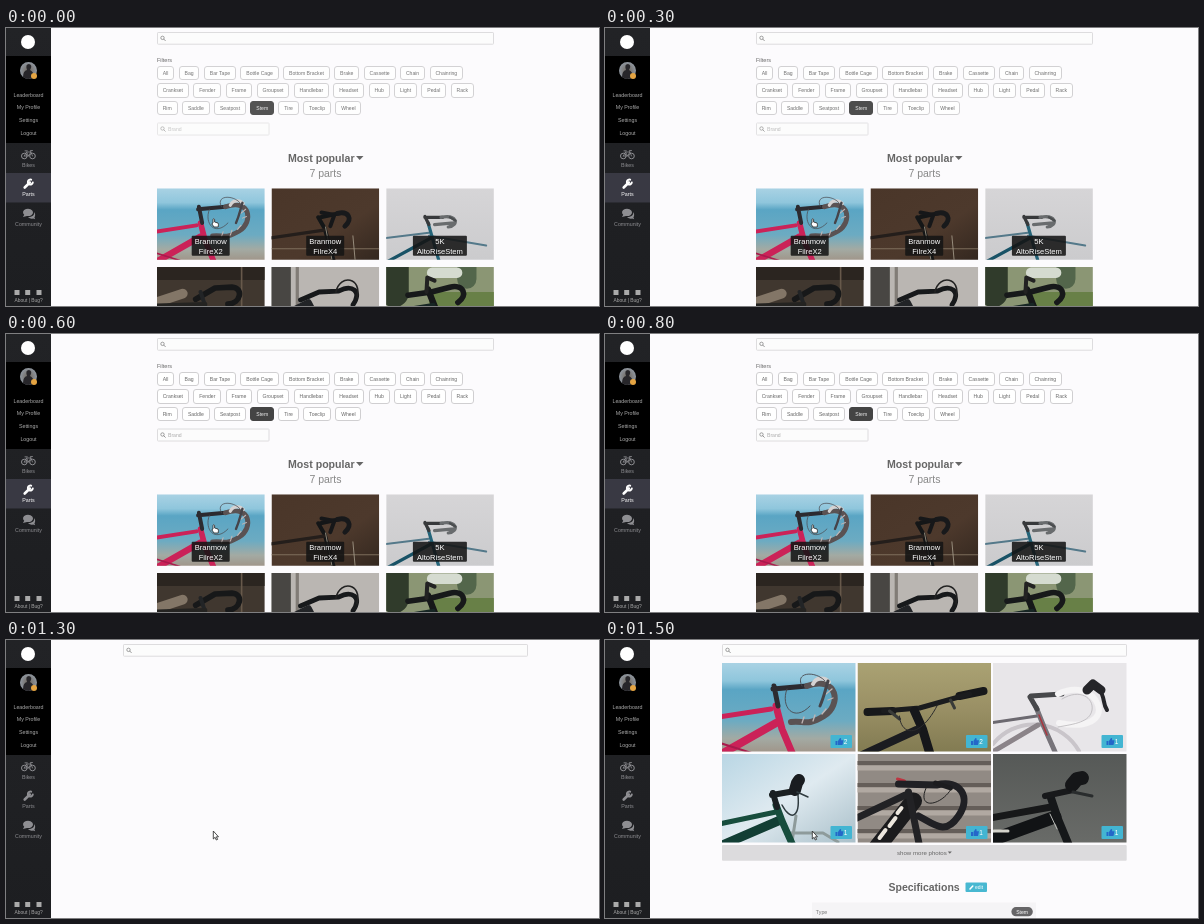
Animation, 593 px wide and 278 px high, one loop 1900 ms. Source, as an HTML page:

```html
<!DOCTYPE html>
<html lang="en">
<head>
<meta charset="utf-8">
<title>Bike parts</title>
<style>
  html, body { margin: 0; width: 100%; height: 100%; overflow: hidden; background: #fcfbfd; }
  body { position: relative; font-family: "Liberation Sans", Arial, sans-serif; }
  svg { position: absolute; left: 0; top: 0; display: block; font-family: inherit; }
  #chips { position: absolute; left: 150.8px; top: 37.7px; }
  .row { display: flex; gap: 4.5px; height: 17.5px; }
  .chip { box-sizing: border-box; height: 14.6px; padding: 0 4.85px; border: 1px solid #d0cfd1;
    border-radius: 3px; font-size: 5.1px; line-height: 12.6px; color: #666; background: #fff; white-space: nowrap; }
  .chip.on { color: #eee; background: #444; border-color: #444; }
</style>
</head>
<body>
<svg id="stage" width="593" height="278" viewBox="0 0 593 278">
  <defs>
    <linearGradient id="sea" x2="0" y2="1">
      <stop stop-color="#a9d2e4"/><stop offset=".2" stop-color="#8fc6dc"/>
      <stop offset=".3" stop-color="#5aa5c4"/><stop offset=".65" stop-color="#6cabc2"/>
      <stop offset=".85" stop-color="#a3aaa3"/><stop offset="1" stop-color="#a0968a"/>
    </linearGradient>
    <linearGradient id="grass" x2="0" y2="1">
      <stop stop-color="#aaa273"/><stop offset=".5" stop-color="#9a9065"/><stop offset="1" stop-color="#827b52"/>
    </linearGradient>
    <linearGradient id="mist" x2="1" y2="1">
      <stop stop-color="#b9d6e4"/><stop offset=".5" stop-color="#dfeaf0"/><stop offset="1" stop-color="#a9bfc9"/>
    </linearGradient>
    <linearGradient id="slate" x2="0" y2="1">
      <stop stop-color="#565957"/><stop offset="1" stop-color="#696b68"/>
    </linearGradient>
    <linearGradient id="room" x2="1" y2="1">
      <stop stop-color="#4a3629"/><stop offset=".6" stop-color="#4d392c"/><stop offset="1" stop-color="#33271f"/>
    </linearGradient>
    <linearGradient id="wall" x2="0" y2="1">
      <stop stop-color="#d6d5d7"/><stop offset="1" stop-color="#cbcbcd"/>
    </linearGradient>
    <linearGradient id="dusk" x2="0" y2="1">
      <stop stop-color="#222326"/><stop offset="1" stop-color="#1d1e21"/>
    </linearGradient>
    <radialGradient id="portrait">
      <stop stop-color="#6d655b"/><stop offset="1" stop-color="#8f969f"/>
    </radialGradient>
  </defs>
</svg>
<div id="chips"></div>

<script>
const LOOP = 1900;
const stage = document.getElementById('stage');
const chips = document.getElementById('chips');

function add(parent, tag, attrs, content) {
  const el = document.createElementNS('http://www.w3.org/2000/svg', tag);
  for (const key in attrs) el.setAttribute(key, attrs[key]);
  if (content !== undefined) el.textContent = content;
  parent.append(el);
  return el;
}
const group = (parent, transform = '') => add(parent, 'g', { transform });
const rect = (p, x, y, width, height, fill, more) => add(p, 'rect', { x, y, width, height, fill, ...more });
const dot = (p, cx, cy, r, fill, more) => add(p, 'circle', { cx, cy, r, fill, ...more });
const fillPath = (p, d, fill, more) => add(p, 'path', { d, fill, ...more });
const line = (p, d, stroke, width) => add(p, 'path', {
  d, stroke, fill: 'none', 'stroke-width': width, 'stroke-linecap': 'round', 'stroke-linejoin': 'round' });
const text = (p, x, y, size, fill, content, more) =>
  add(p, 'text', { x, y, 'font-size': size, fill, ...more }, content);
const middle = { 'text-anchor': 'middle' };
const bold = { 'font-weight': 'bold' };

// Stepped opacity: a list of [time in ms, value].
function steps(el, table) {
  const frames = table.map(([t, opacity]) => ({ offset: t / LOOP, opacity, easing: 'steps(1, end)' }));
  frames.push({ offset: 1, opacity: table[table.length - 1][1] });
  el.animate(frames, { duration: LOOP, iterations: Infinity });
}

// Each scene: background, then [colour, width, path] strokes in a 133.5 x 88.5 box.
const scenes = {
  coast: ['sea', [
    ['#cb2258', 5, 'M-3 54L49 46'], ['#cb2258', 8, 'M-4 93L54 60'],
    ['#cb2258', 7, 'M54 43L60 66L71 92'], ['#a91a4c', 2, 'M-2 80L36 92'],
    ['#2c2b30', 5, 'M52 23L56 43M51 26L85 23'],
    ['#5a5253', 6, 'M85 23C116 12 120 42 102 53S82 57 69 59'],
    ['#c1b5b4', 1.3, 'M110 26L104 31M111 35L106 37M104 46L100 51M93 52L91 58M82 54L80 60'],
    ['#d5d2d2', 4, 'M91 21C94 14 103 14 107 19'], ['#45444a', 3, 'M106 18C103 28 102 34 98 43'],
    ['#4a4a50', .9, 'M80 23C72 8 95 8 103 18M65 26C58 44 72 60 88 43']]],
  meadow: ['grass', [
    ['#17181a', 8, 'M10 49L35 48M102 33L126 28'], ['#1b1c1e', 5, 'M26 48L62 45L112 31'],
    ['#16171a', 9, 'M57 48L65 66L74 96'], ['#1b1c20', 8, 'M-4 96L59 67'],
    ['#393b39', 3, 'M32 48L42 56M93 37L97 45'], ['#2b2b2c', 1, 'M42 53C43 72 62 77 80 42']]],
  snow: ['#e8e6e9', [
    ['#c9c5ca', 4, 'M0 81A52 52 0 0 1 86 88'], ['#6c6970', 3, 'M-3 60L44 53'],
    ['#8b8489', 5, 'M-4 91L45 62'], ['#77747a', 5, 'M43 44L51 64L63 91'],
    ['#a9353e', 1.5, 'M46 52L54 72'], ['#47484b', 5, 'M37 34L44 46M38 33L69 31'],
    ['#f5f4f5', 6, 'M65 31C83 22 100 28 105 42S94 66 66 60'],
    ['#b9b6ba', .8, 'M69 36C87 25 101 35 99 47S82 61 65 64'],
    ['#252529', 9, 'M94 27L100 21L108 27'], ['#252529', 4, 'M105 25C113 34 109 40 114 47']]],
  harbor: ['mist', [
    ['#8e9b9b', 3, 'M67 79L101 79L116 88M74 62L70 88'], ['#174d3d', 5, 'M-3 70L54 58'],
    ['#123e34', 9, 'M-4 93L56 67'], ['#174d3d', 7, 'M54 51L60 67L72 94'],
    ['#1a2022', 6, 'M51 39L55 53M50 41L73 37'], ['#191c20', 12, 'M73 36L75 29L77 26'],
    ['#303c40', 1.5, 'M75 38L86 43M60 51C69 68 78 63 76 41']]],
  stairs: ['#918a84', [
    ['#655e59', 4, 'M0 9H134M0 31H134M0 54H134M0 77H134'],
    ['#b1a9a2', 5, 'M0 14H134M0 36H134M0 59H134M0 82H134'],
    ['#1b1b1d', 17, 'M19 94L56 47'], ['#222225', 7, 'M-3 65L48 41M51 38L62 92'],
    ['#ece7de', 4, 'M22 84L28 76M32 72L38 64M40 59L44 54'], ['#bd3541', 3, 'M40 25L47 27'],
    ['#202024', 7, 'M41 30L79 31C103 25 114 43 101 62S79 72 61 62'],
    ['#1c1c1f', 5, 'M78 29L93 34'], ['#222', 1, 'M70 31C57 56 82 53 93 36']]],
  tarmac: ['slate', [
    ['#171819', 7, 'M-3 64L58 53'], ['#111315', 13, 'M-4 87L62 63'],
    ['#151719', 8, 'M58 44L65 65L77 94'], ['#18191b', 6, 'M52 42L80 36'],
    ['#151618', 14, 'M79 31L84 25L89 24'], ['#292c2d', 3, 'M80 38L99 42'],
    ['#d3d2ca', 3, 'M1 77H15'], ['#bbbcb9', 1, 'M57 60L64 75']]],
  cellar: ['room', [
    ['#8b7c68', 1, 'M0 75H134'],
    ['#141617', 5, 'M58 36L66 50L78 93M61 36L84 31'], ['#18191b', 6, 'M82 31C96 28 101 38 91 47'],
    ['#161719', 5, 'M62 30L78 33L73 47'], ['#241e1b', 4, 'M-4 62L65 52'],
    ['#aaa190', 1, 'M67 48L76 94M104 92L101 59']]],
  plaster: ['wall', [
    ['#54798a', 2.5, 'M-3 62L53 55M53 59L124 71'], ['#246479', 4, 'M52 43L66 92'],
    ['#185266', 4, 'M-4 94L55 62'], ['#37393b', 4, 'M48 35L53 45M48 36L70 36'],
    ['#696c6e', 4, 'M68 36C88 32 91 46 77 48M60 45L84 43'], ['#4b4e50', 3, 'M79 36L86 40']]],
  hallway: ['#40372f', [
    ['#2b2520', 20, 'M-4 6H136'], ['#837667', 12, 'M-4 45L32 33'], ['#67594b', 2, 'M105 0V90'],
    ['#171819', 7, 'M48 40L72 26L93 25C108 26 104 45 88 46'], ['#222426', 5, 'M54 31L61 52L79 88'],
    ['#242321', 5, 'M-3 48L60 46']]],
  concrete: ['#bab6b2', [
    ['#484643', 32, 'M8-5V90'], ['#817c76', 4, 'M32 0V90'],
    ['#17191b', 6, 'M36 41L59 31L83 30C100 21 113 30 101 47'],
    ['#222427', 8, 'M28 53L46 44L69 88'], ['#222', 2, 'M80 31C85 8 113 13 106 38']]],
  garden: ['#8b9674', [
    ['#303b2b', 36, 'M10-4V32'], ['#53664b', 24, 'M100-4V15'],
    ['#d5dbd0', 13, 'M57 7H88'], ['#688047', 24, 'M65 43H136'],
    ['#17191a', 7, 'M27 35L56 31L79 25C96 21 102 35 89 44'], ['#161819', 8, 'M52 28L61 51L82 88'],
    ['#172624', 7, 'M-3 58L58 48'], ['#222', 5, 'M50 31L51 13L60 17']]]
};

function photo(parent, name, x, y, scale = 1) {
  const [back, strokes] = scenes[name];
  const frame = add(parent, 'svg', { x, y, width: 133.5 * scale, height: 88.5 * scale,
    viewBox: '0 0 133.5 88.5', preserveAspectRatio: 'xMidYMid slice' });
  rect(frame, 0, 0, 134, 89, back[0] === '#' ? back : `url(#${back})`);
  strokes.forEach(([color, width, d]) => line(frame, d, color, width));
}

function magnifier(parent, x, y) {
  dot(parent, x - .5, y - .5, 1.7, 'none', { stroke: '#888', 'stroke-width': .8 });
  line(parent, `M${x + .8} ${y + .8}l1.5 1.5`, '#888', .9);
}
function field(parent, x, y, width, height) {
  rect(parent, x + .5, y + .5, width - 1, height - 1, '#fcfcfc', { stroke: '#dddcde', rx: .6 });
  magnifier(parent, x + 6, y + height / 2);
}

// Sidebar
const side = group(stage);
rect(side, 0, 0, 45, 278, 'url(#dusk)');
rect(side, 0, 28, 45, 87, '#000');
dot(side, 22, 14, 7, '#fff');
dot(side, 22.5, 42.5, 8.5, 'url(#portrait)');
fillPath(side, 'M17 49Q17 43 21 42Q19 36 23 36Q27 37 24 42Q28 44 28 49Q22 53 17 49', '#27262a');
dot(side, 28, 48, 3, '#e4a442');
['Leaderboard', 'My Profile', 'Settings', 'Logout'].forEach((label, i) =>
  text(side, 22.5, 68.6 + i * 12.7, 5.3, '#aaa', label, middle));

function partsItem(parent, color) {
  text(parent, 22.5, 168, 5.3, color, 'Parts', middle);
  line(parent, 'M18.7 159.5L23.8 154.5', color, 2.6);
  line(parent, 'M25.2 151.7A2.5 2.5 0 1 0 26.8 154.5', color, 1.9);
}
const gray = '#8e8e92';
text(side, 22.5, 138.6, 5.3, gray, 'Bikes', middle);
[18.3, 26.5].forEach(x => dot(side, x, 128, 2.8, 'none', { stroke: gray, 'stroke-width': 1 }));
line(side, 'M18.3 128L20.5 124H25L22.5 128H18.3M20.5 124L22.5 128M26.5 128L24.4 122.5H26.5M19 122.8H21.3', gray, .8);
partsItem(side, gray);
text(side, 22.5, 197.7, 5.3, gray, 'Community', middle);
fillPath(side, 'M20 181a5 3.7 0 1 1 1 7l-4 1 1.2-2.2A5 3.7 0 0 1 20 181', gray);
fillPath(side, 'M28 184c1 3-2 5-6 5 2 2 4 1.8 5 1.4l2.2.8-.8-1.8c1-1.5 1.2-3.8-.4-5.4', gray);
[11, 21.7, 33].forEach(x => rect(side, x - 2.5, 262, 5, 5, '#aaa'));
text(side, 22.7, 274.2, 4.9, '#aaa', 'About | Bug?', middle);

const active = group(stage);
rect(active, 0, 145, 45, 29.5, '#393943');
partsItem(active, '#fff');
steps(active, [[0, 1], [900, 0]]);

// Parts list
const list = group(stage);
field(list, 151, 4, 337, 12.7);
text(list, 151, 34, 5.5, '#666', 'Filters');
const brand = group(list);
field(brand, 151, 94.5, 112.5, 13);
text(brand, 162, 103, 5.1, '#aaa', 'Brand');
text(list, 282, 133.7, 10.6, '#666', 'Most popular', bold);
fillPath(list, 'M350 128H357.5L353.7 132Z', '#666');
text(list, 319.5, 148.7, 10.5, '#888', '7 parts', middle);

const columns = [151, 265.5, 380.2];
['coast', 'cellar', 'plaster', 'hallway', 'concrete', 'garden'].forEach((name, i) =>
  photo(list, name, columns[i % 3], i < 3 ? 160.3 : 239, .806));
[['Branmow', 'FilreX2', 38], ['Branmow', 'FilreX4', 38], ['5K', 'AltoRiseStem', 54]].forEach(([maker, model, width], i) => {
  const x = columns[i] + 53.7;
  rect(list, x - width / 2, 207.7, width, 20, '#151515', { opacity: .88, rx: 1 });
  text(list, x, 215.5, 7.6, '#fff', maker, middle);
  text(list, x, 226.2, 7.6, '#fff', model, middle);
});

[
  ['All', 'Bag', 'Bar Tape', 'Bottle Cage', 'Bottom Bracket', 'Brake', 'Cassette', 'Chain', 'Chainring'],
  ['Crankset', 'Fender', 'Frame', 'Groupset', 'Handlebar', 'Headset', 'Hub', 'Light', 'Pedal', 'Rack'],
  ['Rim', 'Saddle', 'Seatpost', 'Stem', 'Tire', 'Toeclip', 'Wheel']
].forEach(labels => {
  const row = document.createElement('div');
  row.className = 'row';
  labels.forEach(label => {
    const chip = document.createElement('span');
    chip.className = label === 'Stem' ? 'chip on' : 'chip';
    chip.textContent = label;
    row.append(chip);
  });
  chips.append(row);
});
steps(list, [[0, 1], [900, 0]]);
steps(chips, [[0, .92], [200, .95], [400, .98], [600, 1], [900, 0]]);
steps(brand, [[0, .65], [100, .7], [200, .75], [300, .82], [400, .9], [500, .96], [600, 1]]);

// Part details
const blank = group(stage);
field(blank, 117, 4, 405, 12.7);
steps(blank, [[0, 0], [900, 1]]);

const detail = group(stage);
['coast', 'meadow', 'snow', 'harbor', 'stairs', 'tarmac'].forEach((name, i) => {
  const x = 117 + i % 3 * 135.5;
  const y = i < 3 ? 23 : 114;
  photo(detail, name, x, y);
  const badge = group(detail, `translate(${x + 108.5} ${y + 72})`);
  rect(badge, 0, 0, 21.5, 13, '#43b5d2', { rx: 1 });
  fillPath(badge, 'M5 6H7V10H5ZM7.5 6L9.5 3Q11 2.6 10.6 5.2H13L12 10H7.5Z', '#2467c9');
  text(badge, 15, 9, 6.5, '#fff', i < 2 ? '2' : '1', middle);
});
rect(detail, 117, 205, 404.7, 15.7, '#dcdbdd', { rx: 1 });
text(detail, 292, 214.8, 6.1, '#666', 'show more photos');
fillPath(detail, 'M342.8 211.5H346.8L344.8 213.8Z', '#666');
text(detail, 283.5, 250.6, 10.5, '#666', 'Specifications', bold);
rect(detail, 360.5, 242.5, 21.5, 9.5, '#48b8d1', { rx: 1 });
line(detail, 'M365 249L367.8 246', '#fff', 1.5);
text(detail, 370, 249, 5, '#fff', 'edit');
rect(detail, 207, 262.5, 224, 16, '#f5f4f6');
text(detail, 210.8, 273.7, 5.3, '#777', 'Type');
rect(detail, 406.4, 267.1, 21.4, 9.2, '#666567', { rx: 4.5 });
text(detail, 417.1, 273.6, 5.1, '#fff', 'Stem', middle);
steps(detail, [[0, 0], [1400, 1]]);

// Pointers
const outline = { stroke: '#222', 'stroke-width': .8, 'stroke-linejoin': 'round' };
const arrow = 'M207.3 191V199L209.1 197.3L210.3 200L211.6 199.4L210.4 196.8H212.5Z';
const hand = group(stage);
fillPath(hand, 'M207 191.2Q208 190 208.6 191.3V194L212 195Q212.8 195.4 212.2 199H208L205.8 195.8L207 195Z', '#fff', outline);
const busy = group(stage);
fillPath(busy, arrow, '#222', { transform: 'translate(-.6 -.7)' });
dot(busy, 209.8, 198.2, 1.5, '#fff', { stroke: '#333', 'stroke-width': .8 });
const pointer = group(stage);
fillPath(pointer, arrow, '#fff', outline);
steps(hand, [[0, 1], [900, 0]]);
steps(busy, [[0, 0], [900, 1], [1200, 0]]);
steps(pointer, [[0, 0], [1200, 1]]);
</script>
</body>
</html>
```
